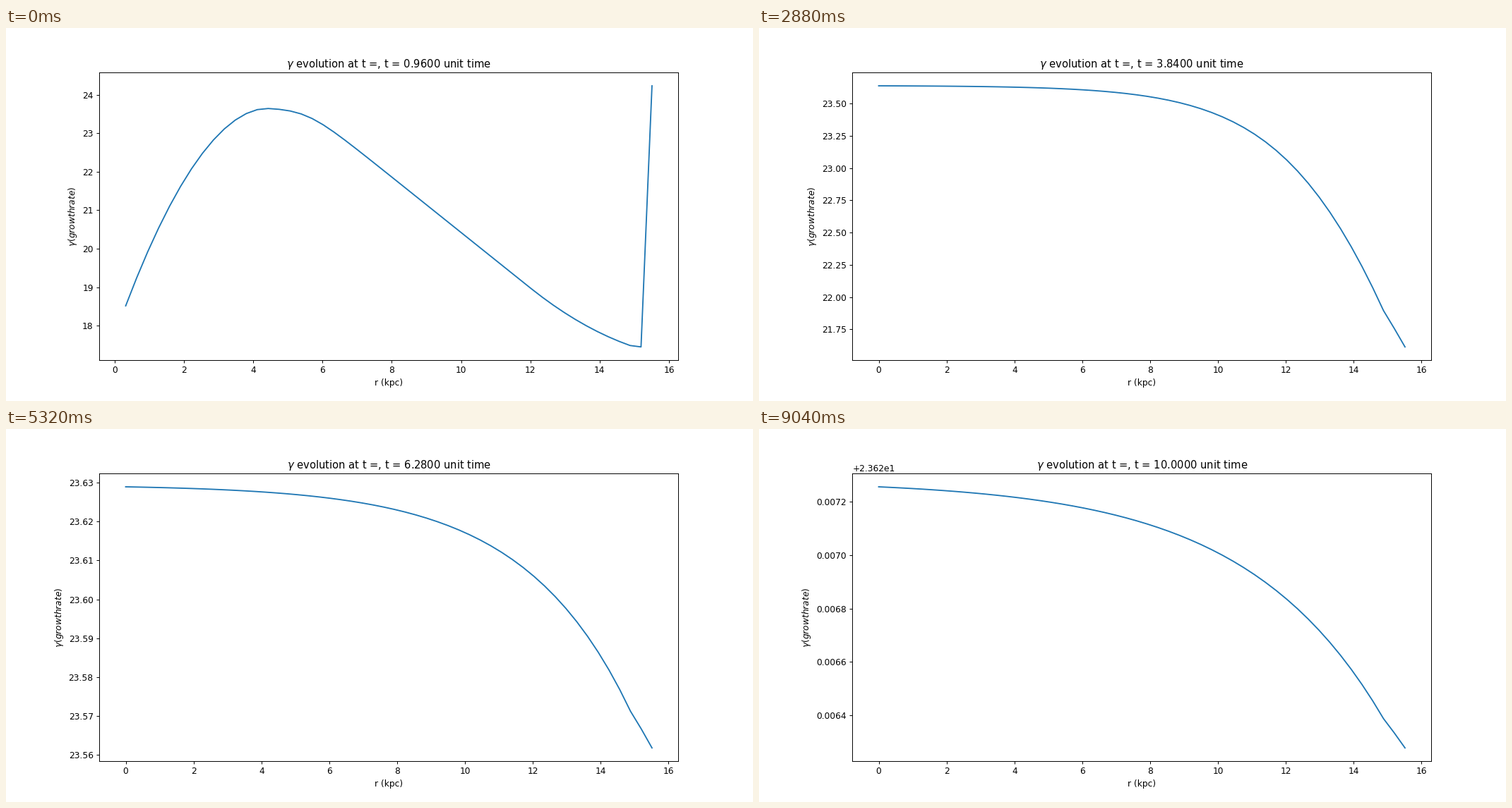
A matplotlib script for the animation above (9.08 s loop, 1058x529 px).

```python
import numpy as np
import matplotlib.pyplot as plt
from matplotlib.animation import FuncAnimation

FRAMES, INTERVAL = 227, 40
T0, DT = 0.96, 0.04
LIMIT = 23.6272  # growth rate reached in the end
r = np.linspace(0, 15.51, 50)
times = T0 + DT * np.arange(FRAMES)


def smooth(xk, yk, x):
    """Monotone cubic through the points (xk, yk)."""
    h = np.diff(xk)
    d = np.diff(yk) / h
    mid = 2 * d[:-1] * d[1:] / (d[:-1] + d[1:])
    m = np.concatenate((d[:1], mid, d[-1:]))
    i = np.clip(np.searchsorted(xk, x, side="right") - 1, 0, len(h) - 1)
    u = np.clip((x - np.take(xk, i)) / h[i], 0, 1)
    v = 1 - u
    return (np.take(yk, i) * (1 + 2 * u) * v**2
            + np.take(yk, i + 1) * (3 - 2 * u) * u**2
            + h[i] * u * v * (m[i] * v - m[i + 1] * u))


# Height of the outer slope at a few moments
key_t = [0.96, 2.8, 3.84, 5.52, 7.08, 8.4, 10.0]
key_span = [6.23, 4.1747, 2.0246, 0.1943, 0.02314, 0.005099, 0.0009777]
spans = np.exp(smooth(key_t, np.log(key_span), times))


def outer_drop(t):
    """Soft ramp from 0 to 1 whose foot moves outward and widens."""
    age = t - T0
    foot = 5.5 + 1.4 * age + 0.6 * age**2
    k = 0.225 + 0.425 * np.exp(-0.43 * (t - 2.8)) + 1.35 * np.exp(-age / 0.4)
    bend = 0.097 * np.exp(-age / 1.15) * np.maximum(r - 12, 0)**2
    edge = 0.25 * np.maximum(r - r[47], 0)
    ramp = np.log1p(np.exp(k * (r - bend - edge - foot)))
    return (ramp - ramp[0]) / (ramp[-1] - ramp[0])


def inner_drop(t):
    """Flank left of the peak, sliding out through the centre."""
    return 0.35 * np.maximum(4.43 - 2.27 * (t - T0) - r, 0)**1.9


def profile(i):
    t, span = times[i], spans[i]
    top = LIMIT + span * (0.0053 + 0.0084 * max(t - 3.84, 0))
    y = top - span * outer_drop(t) - inner_drop(t)
    y[-1] += 6.8 * 0.75**i  # boundary spike dies away
    return y


fig, ax = plt.subplots(figsize=(12, 6), dpi=1058 / 12)
line, = ax.plot([], [])
ax.set_xlabel("r (kpc)")
ax.set_ylabel(r"$\gamma (growthrate)$")


def update(i):
    first = 1 if i < 4 else 0  # the centre is undefined at first
    line.set_data(r[first:], profile(i)[first:])
    ax.relim()
    ax.autoscale_view()
    ax.set_title(rf"$\gamma$ evolution at t =, t = {times[i]:.4f} unit time")
    return line,


anim = FuncAnimation(fig, update, frames=FRAMES, interval=INTERVAL,
                     init_func=lambda: update(0), repeat=True, repeat_delay=0)
plt.show()
```
